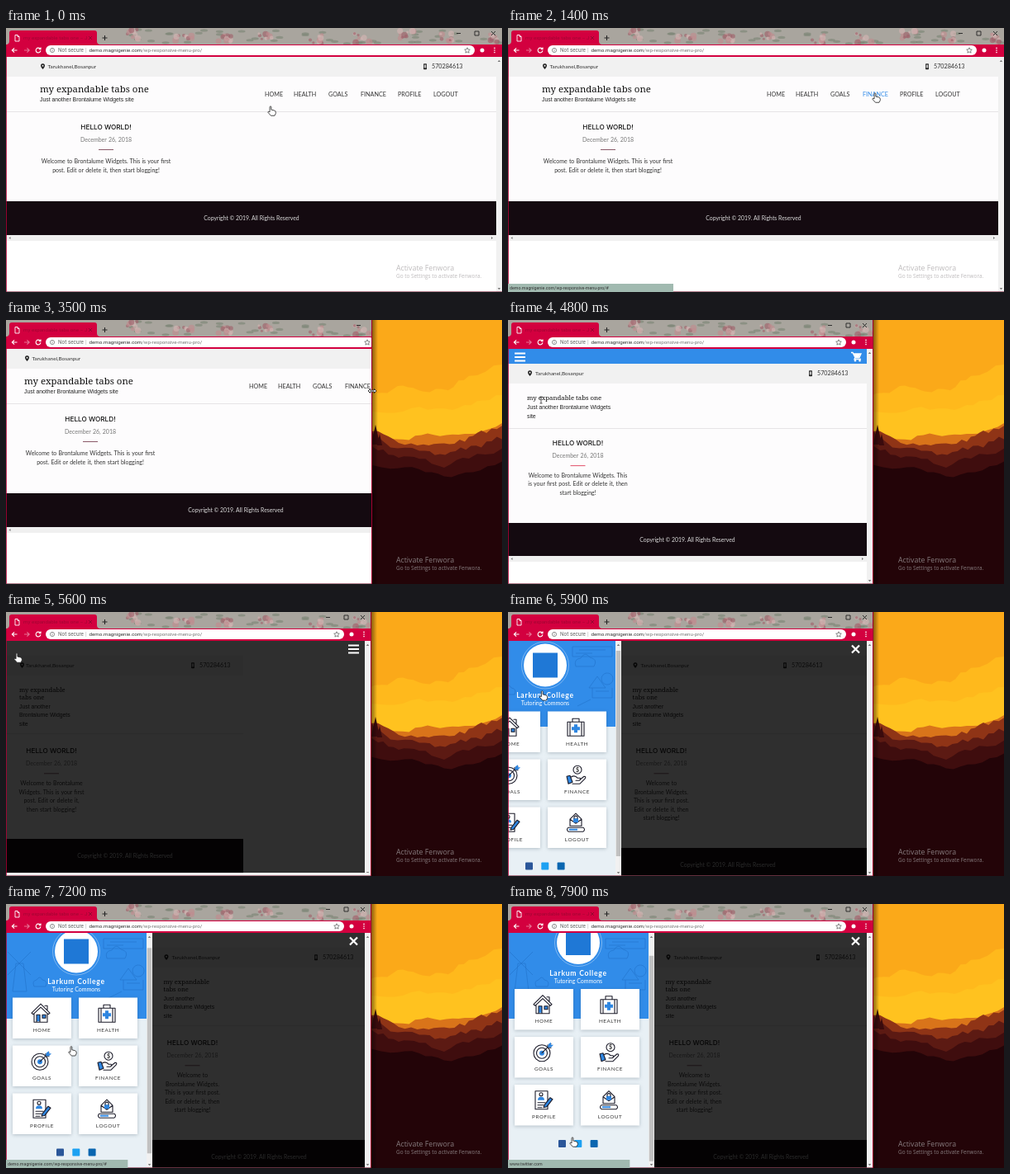
These frames come from a looping animation (600x320 px, 8 s). An HTML page:

```html
<!DOCTYPE html>
<html lang="en">
<head>
<meta charset="utf-8">
<title>Responsive menu demo</title>
<style>
html, body { margin: 0; width: 100%; height: 100%; overflow: hidden; background: #fff; }
svg { display: block; width: 600px; height: 320px; }
text { font-family: Lato, "Open Sans", sans-serif; fill: #333; white-space: pre; }
.slab { font-family: "Noto Serif", serif; fill: #111; }
.sub { font-family: "Liberation Sans", Arial, sans-serif; fill: #222; }
.head { font-family: Inter, sans-serif; font-weight: 500; fill: #111; }
.ui { font-family: Roboto, sans-serif; }
.note { font-family: "Open Sans", sans-serif; fill: #a8a4a6; opacity: .75; }
.mid { text-anchor: middle; }
.copy { word-spacing: .4px; }
.line { fill: none; stroke: #1c1c2a; stroke-width: 1.1; stroke-linejoin: round; stroke-linecap: round; }
.blue { fill: #2f86e0; }
.card { filter: drop-shadow(0 1px 2px rgba(40, 60, 80, .28)); }
</style>
</head>
<body>
<svg id="stage" viewBox="0 0 600 320" xmlns="http://www.w3.org/2000/svg"></svg>
<script>
const LOOP = 8000, STEP = 100;
const CRIMSON = '#d3003f', BLUE = '#318ce9';
const ADDRESS = ['demo.magnigenie.com', '/wp-responsive-menu-pro/'];
const NAV = [['HOME', 313, 334], ['HEALTH', 348, 376], ['GOALS', 390, 414],
  ['FINANCE', 429, 460], ['PROFILE', 474, 503], ['LOGOUT', 517, 547]];
const CARDS = ['HOME', 'HEALTH', 'GOALS', 'FINANCE', 'PROFILE', 'LOGOUT'];

const rect = (x, y, w, h, fill, more = '') =>
  `<rect x="${x}" y="${y}" width="${w}" height="${h}" fill="${fill}" ${more}/>`;
const path = (d, more = '') => `<path d="${d}" ${more}/>`;
const text = (x, y, size, str, cls = '', more = '') =>
  `<text x="${x}" y="${y}" font-size="${size}" class="${cls}" ${more}>${str}</text>`;
const lines = (x, y, size, gap, list, cls, more) =>
  list.map((s, i) => text(x, y + i * gap, size, s, cls, more)).join('');
const group = (id, inner, more = '') => `<g id="${id}" ${more}>${inner}</g>`;
const at = (x, y, inner) => `<g transform="translate(${x} ${y})">${inner}</g>`;

let seed = 7;
const rnd = () => (seed = seed * 16807 % 2147483647) / 2147483647;

// Hills: a ridge through a few points, roughened between them
function ridge(points, fill, rough) {
  let d = `M${points[0]} `;
  for (let i = 1; i < points.length; i++) {
    const [x0, y0] = points[i - 1], [x1, y1] = points[i];
    for (let k = 1; k <= 4; k++) {
      const u = k / 4;
      d += `L${(x0 + (x1 - x0) * u).toFixed(1)} ${(y0 + (y1 - y0) * u + (rnd() - .5) * rough).toFixed(1)} `;
    }
  }
  return path(d + 'V320H420Z', `fill="${fill}"`);
}

function wallpaper() {
  const tree = (x, y, h) => path(`M${x} ${y}l${h * .22} ${h}h${-h * .44}z`, 'fill="#3a0b0d"');
  return rect(0, 0, 600, 320, '#fba919')
    + ridge([[420, 90], [455, 90], [480, 78], [505, 86], [535, 84], [560, 68], [600, 54]], '#ffb91c', 6)
    + ridge([[420, 108], [460, 112], [500, 106], [540, 110], [570, 98], [600, 92]], '#ffc21f', 5)
    + ridge([[420, 140], [480, 146], [510, 138], [540, 140], [570, 138], [600, 126]], '#d9741a', 4)
    + ridge([[420, 130], [450, 134], [475, 148], [505, 152], [530, 150], [555, 146], [575, 136], [600, 130]], '#8f3416', 5)
    + ridge([[420, 134], [448, 138], [465, 152], [500, 160], [525, 164], [550, 156], [575, 152], [600, 142]], '#5c1a13', 6)
    + ridge([[420, 154], [450, 156], [475, 166], [500, 168], [530, 178], [560, 166], [600, 158]], '#3f0d0e', 5)
    + ridge([[420, 170], [465, 178], [500, 180], [530, 190], [565, 184], [600, 172]], '#230408', 5)
    + tree(447, 127, 24) + tree(452, 138, 14);
}

function titleBar() {
  let out = rect(0, 0, 600, 20, '#a9a59e');
  for (let i = 0; i < 9; i++) {
    const cx = 150 + i * 54 + rnd() * 16, cy = 5 + rnd() * 9;
    for (let k = 0; k < 5; k++)
      out += `<ellipse cx="${cx + (rnd() - .5) * 46}" cy="${cy + (rnd() - .5) * 16}" rx="4.5" ry="1.6" fill="#7d8676" opacity=".65"/>`;
    for (let k = 0; k < 9; k++)
      out += `<circle cx="${cx + (rnd() - .5) * 20}" cy="${cy + (rnd() - .5) * 12}" r="${1.5 + rnd() * 2.5}" fill="${['#c08c8f', '#a0626b', '#d3b4b2'][k % 3]}" opacity=".65"/>`;
  }
  return `<g clip-path="url(#top)">${out}</g>`
    + path('M1 20Q4 19 4 16V6Q4 3 7 3H107Q110 3 110 6V16Q110 19 113 20Z', `fill="${CRIMSON}"`)
    + path('M11 8.5h3l2 2v5.5h-5zM14 8.5v2h2', 'fill="none" stroke="#fff" stroke-width=".9"')
    + text(21, 14.3, 6.2, 'my expandable tabs one – J', 'ui', 'style="fill:#a00533"')
    + path('M100 10l4 4m0-4l-4 4', 'stroke="#8f0a30" stroke-width=".9"')
    + path('M116.5 12h6m-3-3v6', 'stroke="#222" stroke-width="1"');
}

function toolBar() {
  const white = 'fill="none" stroke="#fff" stroke-width="1.1"';
  return rect(0, 20, 600, 15, CRIMSON)
    + path('M13.5 27h-6m2.6-2.7L7.3 27l2.8 2.7', white)
    + path('M22 27h6m-2.6-2.7L28.2 27l-2.8 2.7', white + ' opacity=".45"')
    + path('M41.3 25.2a2.9 2.9 0 1 0 .6 2.2M42 23.5v2.2h-2.3', white)
    + rect(48, 21, 519, 12, '#fff', 'rx="6" id="pill"')
    + '<circle cx="56" cy="27" r="2.6" fill="none" stroke="#666" stroke-width=".7"/>'
    + path('M56 26.6v1.7M56 25.3v.6', 'stroke="#666" stroke-width=".7"')
    + text(63, 29.3, 6.4, 'Not secure', 'ui', 'style="fill:#666"') + rect(96.5, 24, .6, 6, '#bbb')
    + `<text x="100.5" y="29.3" font-size="6.23" class="ui">${ADDRESS[0]}<tspan fill="#777">${ADDRESS[1]}</tspan></text>`
    + group('tools',
      path('M-42 23.8l1 2.2 2.3.2-1.7 1.6.5 2.3-2.1-1.2-2.1 1.2.5-2.3-1.7-1.6 2.3-.2z', 'fill="none" stroke="#555" stroke-width=".7"')
      + '<circle cx="-24" cy="27" r="2.5" fill="#fff"/>'
      + [24.4, 27, 29.6].map(y => `<circle cx="-9" cy="${y}" r=".8" fill="#fff"/>`).join('')
      + path('M-55 6.5h5M-33 4h5v5h-5zM-13 4l5 5m0-5l-5 5', 'fill="none" stroke="#222" stroke-width=".9"'));
}

const pin = (x, y) => at(x, y, path('M0 3.6C-4-1-2.5-3.3 0-3.3S4-1 0 3.6z', 'fill="#222"') + '<circle cy="-.8" r="1" fill="#f1f1f1"/>');
const phone = (x, y) => rect(x - 2, y - 3.4, 4, 7, '#222', 'rx=".8"') + rect(x - 1.3, y - 2.2, 2.6, 3.9, '#bbb');

function page(o) {
  const { w, strip, x, tel, col, hello } = o;
  const titleEnd = o.titleY + (o.title.length - 1) * 9;
  return rect(0, 35, w, 285, '#fdfcfd') + rect(0, strip, w, 24, '#f1f1f1')
    + pin(x + 3.5, strip + 11.5) + text(x + o.indent, strip + 14.3, 6.4, 'Tarukhanel,Bosanpur')
    + phone(tel, strip + 11.7) + text(tel + 8, strip + 14.3, 7.2, '570284613')
    + rect(0, o.rule, w, 1, '#e6e4e6')
    + lines(x, o.titleY, o.size, 9, o.title, 'slab')
    + lines(x, titleEnd + 11.3, 6.85, 10.5, o.sub, 'sub')
    + text(col, hello, 8.2, 'HELLO WORLD!', 'head mid')
    + text(col, hello + 15.3, 7, 'December 26, 2018', 'mid copy', 'style="fill:#777"')
    + rect(col - 9, hello + 24.3, 18, 1, o.accent || '#8a5a68')
    + lines(col, hello + (o.lead || 39), 7, 10.5, o.body, 'mid copy')
    + rect(0, o.foot, w, 41, '#140a10')
    + text(o.footX, o.foot + 22.7, 6.85, 'Copyright © 2019. All Rights Reserved', 'mid', 'style="fill:#ddd"');
}

const hScroll = (y, w) => rect(0, y, w, 7, '#f0f0f0')
  + path(`M5.5 ${y + 2}v3l-2-1.5zM${w - 6} ${y + 2}v3l2-1.5z`, 'fill="#777"');
const vScroll = x => rect(x, 35, 7, 285, '#f1f1f1')
  + path(`M${x + 1.8} 41h3.4l-1.7-2.2zM${x + 1.8} 315h3.4l-1.7 2.2z`, 'fill="#777"');
const burger = x => [39.5, 44, 48.5].map(y => rect(x, y, 13, 2, '#fff')).join('');

const SHORT = { title: ['my expandable', 'tabs one'], titleY: 96.5, size: 7.6, strip: 53, rule: 147,
  sub: ['Just another', 'Brontalume Widgets', 'site'], hello: 171 };
const wide = page({ w: 600, strip: 35, x: 41, indent: 9.5, tel: 507, rule: 101, title: ['my expandable tabs one'],
  titleY: 78, size: 11.4, sub: ['Just another Brontalume Widgets site'], col: 121, hello: 122.7, lead: 41.3,
  body: ['Welcome to Brontalume Widgets. This is your first', 'post. Edit or delete it, then start blogging!'],
  foot: 210, footX: 297 });
const narrow = page({ w: 434, strip: 53, x: 23, indent: 10, tel: 366, rule: 131, title: ['my expandable tabs one'],
  titleY: 97, size: 7.8, sub: ['Just another Brontalume Widgets', 'site'], col: 84.5, hello: 151.8, accent: '#e2526b',
  body: ['Welcome to Brontalume Widgets. This', 'is your first post. Edit or delete it, then', 'start blogging!'],
  foot: 246, footX: 217 });
const dimmed = page({ ...SHORT, w: 287, x: 16, indent: 8, tel: 226, col: 55,
  body: ['Welcome to Brontalume', 'Widgets. This is your first', 'post. Edit or delete it,', 'then start blogging!'],
  foot: 275, footX: 144 });
const pushed = page({ ...SHORT, w: 434, x: 13.5, indent: 10, tel: 198, col: 48.5,
  body: ['Welcome to', 'Brontalume Widgets.', 'This is your first post.', 'Edit or delete it, then', 'start blogging!'],
  foot: 286, footX: 129 });

const stroke = (d, more = '') => path(d, `class="line" ${more}`);
const solid = d => path(d, 'class="blue"');
const ring = (x, y, r, cls = 'line') => `<circle cx="${x}" cy="${y}" r="${r}" class="${cls}"/>`;
const ICONS = {
  HOME: solid('M-5 2h4v8h-4zM2 2h4v4H2z') + stroke('M-11 0L0-11 11 0l-2 1.5L0-7l-9 8.5zM-8 1v10H8V1M-5 11V2h4v9M2 2h4v4H2zM5-9h3v5'),
  HEALTH: solid('M-2-3h4v3h3v4H2v3h-4V4h-3V0h3z') + stroke('M-10-6h20v17h-20zM-4-6v-4h8v4M-7-6v17M7-6v17'),
  GOALS: ring(-1, 1, 10) + ring(-1, 1, 6.5) + ring(-1, 1, 3, 'blue') + stroke('M-1 1L10-10M6-9v3.5h4') + solid('M6-6l1-4 3-2v3h3l-3 3z'),
  FINANCE: ring(2, -6, 5) + text(2, -3.5, 7, '$', 'mid', 'font-weight="bold"') + solid('M-11 2l4-1 3 8-5 2z')
    + stroke('M-11 2l4-1 3 8-5 2zM-6 3q5-3 8 1h3q2 2-1 3h-4M5 6l5-4q3 0 1 3l-6 6H-4'),
  PROFILE: stroke('M-9-11H6v22H-9zM-6 3h9M-6 6h7M-6 9h5') + ring(-2, -7, 2) + solid('M-6 0q0-4 4-4t4 4z') + solid('M2 6L9-3l3 2-7 9-4 1z') + stroke('M2 6L9-3l3 2-7 9-4 1z'),
  LOGOUT: stroke('M-7-4L0-11 7-4V4H-7zM-7-4l7 5 7-5') + solid('M-3-5h6v5h-6z') + stroke('M-2-5v-2q2-2 4 0v2M-9 6h18q3 2.5 0 5H-9q-3-2.5 0-5z') + solid('M-8 7.5H2v2H-8z')
};

function menu() {
  const art = 'fill="none" stroke="#2273cd" stroke-width="1" opacity=".65"';
  const back = rect(0, 35, 177, 285, '#e8f0f5') + rect(0, 35, 177, 104, BLUE)
    + path('M8 106l4-34h9l4 34zM16 72L2 58M16 72l14-14M16 72L2 86M16 72l14 14M34 100h14q3-7-4-8-3-6-7 0-6 1-3 8', art)
    + path('M118 42h48v12h-48zM126 46h32M122 50h20M122 66h22q5-9-5-11-6-8-11 1-9 1-6 10M138 92l10-14 10 14zM142 92v12h24V92M160 74a7 7 0 1 0 .1 0M146 96h16M124 114l16-8', art);
  const cards = CARDS.map((name, i) => {
    const x = i % 2 ? 88 : 8, y = 120.5 + (i >> 1) * 58;
    return rect(x, y, 71, 49.5, '#fff', 'class="card"')
      + at(x + 34, y + 18.7, ICONS[name])
      + text(x + 35.5, y + 41, 6.3, name, 'mid', 'letter-spacing=".55"');
  }).join('');
  const social = ['#2a5699', '#1da1f2', '#0a66b0'].map((c, i) => rect(61 + i * 19.3, 303.5, 9, 9, c, 'rx="1"')).join('');
  const body = '<circle cx="85" cy="64.5" r="28.5" fill="none" stroke="#fff" stroke-width=".6" opacity=".6"/>'
    + '<circle cx="85" cy="64.5" r="26" fill="#fff"/>' + rect(70, 49.5, 30, 30, '#1f78d6')
    + text(85, 104, 8.6, 'Larkum College', 'mid', 'style="fill:#fff" font-weight="bold" letter-spacing=".75"')
    + text(85, 113, 7, 'Tutoring Commons', 'mid', 'style="fill:#fff"') + cards + social;
  return back + `<g clip-path="url(#view)">${group('scroll', body)}</g>`
    + vScroll(170) + rect(170.8, 47, 5.4, 249, '#c1c1c1', 'id="thumb"');
}

const shade = rect(0, 35, 434, 285, '#000', 'opacity=".81"');
const outline = 'fill="#fff" stroke="#222" stroke-width=".9" stroke-linejoin="round"';
const POINTERS = {
  hand: path('M-1 .5q1-1.5 2 0v4l4 1q2 .5 2 2.5v1.5L5.5 12.5h-5L-3.5 8q0-2 2.5-.5z', outline + ' transform="scale(.9)"'),
  arrow: path('M0 0v9l2-2 1.5 3 1.2-.6-1.4-3h2.8z', outline),
  resize: path('M-5 0l2.5-2.5v1.6h5v-1.6L5 0 2.5 2.5V.9h-5v1.6z', outline),
  beam: path('M-1.5-4h3M0-4v8M-1.5 4h3', 'stroke="#333" stroke-width=".8" fill="none"')
};

document.getElementById('stage').innerHTML =
  `<defs><clipPath id="win"><rect id="frame" width="600" height="320"/></clipPath>
   <clipPath id="top"><rect width="600" height="20"/></clipPath>
   <clipPath id="view"><rect y="35" width="170" height="285"/></clipPath>
   <linearGradient id="fade"><stop stop-color="#000" stop-opacity=".45"/><stop offset="1" stop-color="#000" stop-opacity="0"/></linearGradient></defs>`
  + wallpaper() + rect(0, 0, 7, 320, 'url(#fade)', 'id="shadow"')
  + group('window', rect(0, 0, 600, 320, '#fff') + titleBar() + toolBar()
    + group('wide', rect(0, 35, 600, 66, '#fdfcfd') + rect(0, 35, 600, 24, '#f1f1f1') + rect(0, 210, 600, 41, '#140a10')
      + group('wideBody', wide + NAV.map(([s, x]) => text(x, 83, 7.2, s, 'nav')).join(''))
      + rect(0, 251, 600, 69, '#fff') + hScroll(251, 593) + group('wideBar', vScroll(593)))
    + group('narrow', narrow + rect(0, 35, 434, 18, BLUE) + burger(8)
      + path('M415 39.5h2l3 6h5l2-4.5h-9M420 45.5l-1 2h8', 'fill="none" stroke="#fff" stroke-width="1.3"')
      + path('M418 41h8.5l-2 4h-4.5z', 'fill="#fff"')
      + '<circle cx="420" cy="49.3" r="1.2" fill="#fff"/><circle cx="425.5" cy="49.3" r="1.2" fill="#fff"/>'
      + rect(0, 287, 441, 33, '#fff') + hScroll(286, 434) + vScroll(434))
    + group('dimmed', rect(0, 35, 441, 285, '#fdfcfd') + dimmed + shade + burger(414) + vScroll(434) + rect(0, 316, 441, 4, '#f4f4f4'))
    + group('open', rect(0, 35, 441, 285, '#fdfcfd') + group('pushed', pushed) + shade
      + path('M416 40.5l9 9m0-9l-9 9', 'stroke="#fff" stroke-width="2.2"') + vScroll(434) + group('menu', menu()))
    + rect(0, 20, .8, 300, '#b30036') + rect(0, 319.3, 600, .7, '#8d4458')
    + group('status', rect(0, 310, 200, 10, '#a1bab0', 'id="statusBox"') + text(2, 317.3, 5.3, '', 'ui', 'id="statusText"'))
    + rect(0, 0, 1, 320, '#a5002f', 'id="edge"'), 'clip-path="url(#win)"')
  + text(472, 294, 8.8, 'Activate Fenwora', 'note') + text(472, 303, 6.4, 'Go to Settings to activate Fenwora.', 'note')
  + group('pointer', Object.entries(POINTERS).map(([k, d]) => group(k, d)).join(''));

const $ = id => document.getElementById(id);
const set = (id, name, value) => $(id).setAttribute(name, value);
const show = (id, on) => set(id, 'display', on ? 'inline' : 'none');
const move = (id, x, y = 0) => set(id, 'transform', `translate(${x} ${y})`);

// Linear value between rows of [time, value, ...]
function track(rows, t, col = 1) {
  if (t <= rows[0][0]) return rows[0][col];
  for (let i = 1; i < rows.length; i++) {
    const a = rows[i - 1], b = rows[i];
    if (t < b[0]) return a[col] + (b[col] - a[col]) * (t - a[0]) / (b[0] - a[0]);
  }
  return rows[rows.length - 1][col];
}

const WIDTH = [[3000, 600], [3100, 590], [3200, 562], [3300, 520], [3400, 479], [3500, 443], [3800, 443], [3900, 442]];
const CURSOR = [[0, 320, 95, 'hand'], [100, 320, 95, 'hand'], [600, 322, 80, 'hand'], [700, 322, 80, 'hand'],
  [800, 355, 80, 'hand'], [1000, 398, 80, 'hand'], [1200, 405, 80, 'hand'], [1400, 444, 79, 'hand'],
  [1700, 486, 79, 'hand'], [2000, 530, 80, 'hand'], [2200, 548, 82, 'arrow'], [2700, 594, 86, 'resize'],
  [3000, 594, 86, 'resize'], [3900, 443, 86, 'arrow'], [4700, 40, 97, 'beam'], [4800, 40, 97, 'beam'],
  [5000, 25, 72, 'arrow'], [5200, 13, 49, 'hand'], [5400, 13, 50, 'hand'], [5600, 13, 50, 'hand'],
  [6300, 79, 157, 'hand'], [7100, 79, 157, 'hand'], [7900, 78, 283, 'hand']];
const SLIDE = [[5600, -177], [5700, -140], [5800, -85], [5900, -40], [6000, -12], [6100, 0]];
const SCROLL = [[7000, 0], [7500, 17.5]];
const navItems = [...document.querySelectorAll('.nav')];

function draw(t) {
  const w = track(WIDTH, t), toolW = track(WIDTH, t - 100), pageW = track(WIDTH, t - 300);

  set('frame', 'width', w);
  set('edge', 'x', w < 600 ? w - 1 : 601);
  set('shadow', 'x', w);
  set('pill', 'width', toolW - 81);
  move('tools', toolW);

  const isWide = pageW > 500;
  show('wide', isWide);
  show('narrow', !isWide && t < 5600);
  show('dimmed', t >= 5600 && t < 5700);
  show('open', t >= 5700);
  move('wideBody', (pageW - 600) / 2);
  move('wideBar', pageW - 600);

  const slide = track(SLIDE, t), scroll = track(SCROLL, t);
  move('menu', slide);
  move('pushed', slide + 177);
  move('scroll', 0, -scroll);
  set('thumb', 'y', 47 + scroll * .9);

  const dragging = t >= 3000 && t < 3900;
  const x = dragging ? w : track(CURSOR, t), y = track(CURSOR, t, 2);
  const kind = CURSOR.filter(r => r[0] <= t).pop()[3];
  move('pointer', x, y);
  for (const k in POINTERS) show(k, k === kind);

  navItems.forEach((n, i) => {
    const over = t >= 400 && t < 2200 && x >= NAV[i][1] - 1 && x <= NAV[i][2] + 1;
    n.style.fill = over ? BLUE : '';
  });

  show('status', t >= 600 && t < 3000 || t >= 6300);
  set('statusBox', 'width', w / 3);
  $('statusText').textContent = t >= 7700 ? 'www.twitter.com' : ADDRESS.join('') + '#';
}

function tick() {
  draw(Math.floor(performance.now() % LOOP / STEP) * STEP);
  requestAnimationFrame(tick);
}
tick();
</script>
</body>
</html>
```
